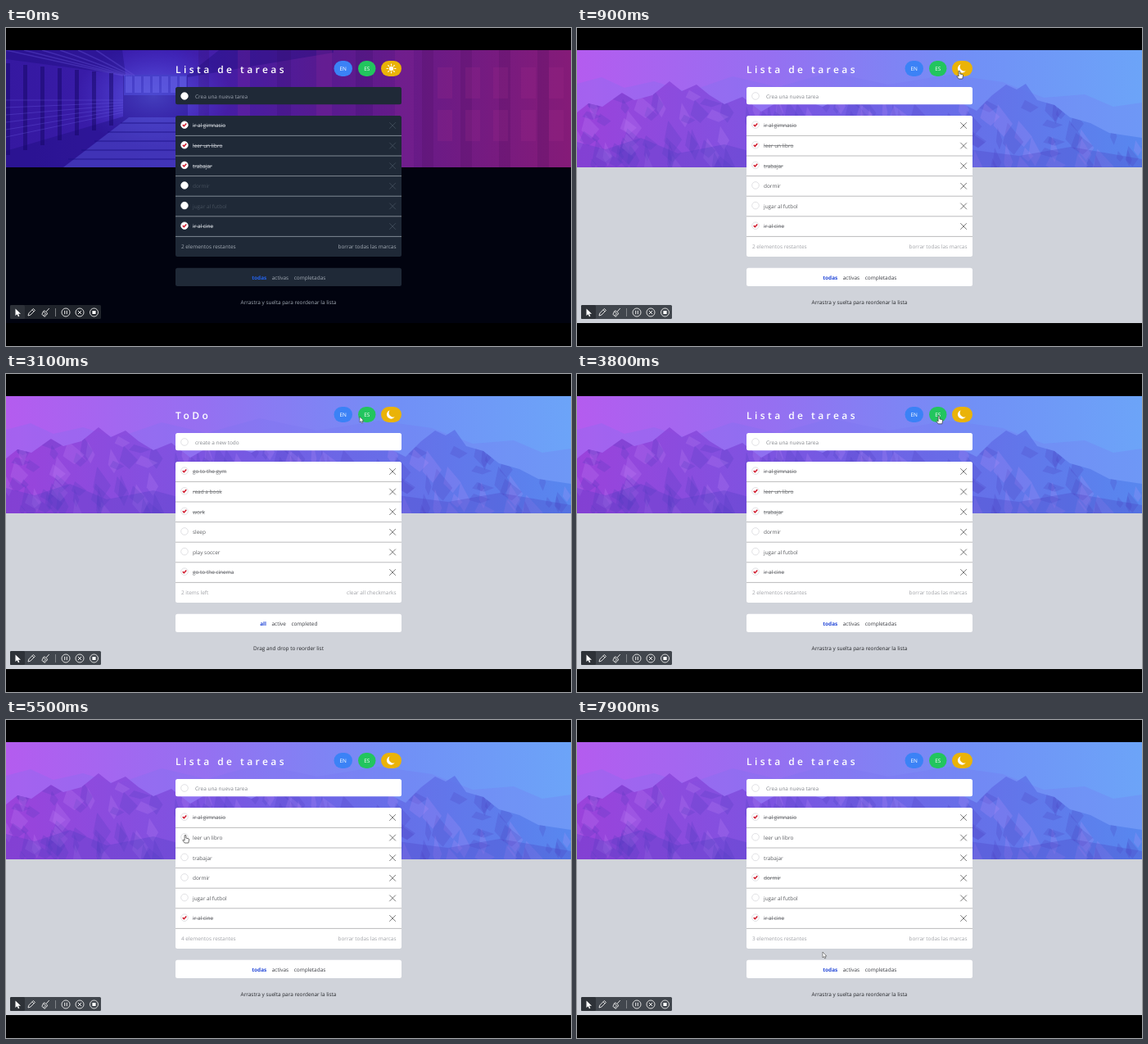
Write an HTML page that moves like this. It is 690x388 px and loops after 8 s.

```html
<!DOCTYPE html>
<html lang="es">
<head>
<meta charset="utf-8">
<style>
  html, body { margin: 0; width: 100%; height: 100%; overflow: hidden; background: #000; }
  svg { display: block; width: 100%; height: 100%; }
  text { font: 6.45px "Open Sans", "Noto Sans", sans-serif; text-rendering: geometricPrecision; white-space: pre; }
  .title { font-size: 12px; font-weight: 600; letter-spacing: 3.45px; }
  .done { text-decoration: line-through; }
  .active { font-weight: 700; }
</style>
</head>
<body>
<svg viewBox="0 0 690 388">
  <defs>
    <linearGradient id="night">
      <stop offset="0" stop-color="#3518a0"/><stop offset=".3" stop-color="#3c1fb0"/>
      <stop offset=".55" stop-color="#561a91"/><stop offset="1" stop-color="#851b78"/>
    </linearGradient>
    <linearGradient id="day">
      <stop offset="0" stop-color="#b45cef"/><stop offset=".35" stop-color="#9570f1"/>
      <stop offset=".7" stop-color="#7190f6"/><stop offset="1" stop-color="#6ca4f8"/>
    </linearGradient>
    <linearGradient id="rock">
      <stop offset="0" stop-color="#983bd6"/><stop offset=".4" stop-color="#7350de"/>
      <stop offset="1" stop-color="#5283ed"/>
    </linearGradient>
    <radialGradient id="glow">
      <stop offset="0" stop-color="#6f7cff" stop-opacity=".65"/><stop offset="1" stop-color="#5a50ee" stop-opacity="0"/>
    </radialGradient>
    <clipPath id="banner"><path d="M0 27H690V170H0Z"/></clipPath>
    <clipPath id="ridge"><path id="ridgeShape"/></clipPath>
  </defs>
  <g id="page"></g>
  <g id="cursor" stroke-linejoin="round"></g>
</svg>
<script>
const page = document.getElementById('page');
const cursor = document.getElementById('cursor');
const LOOP = 8000;

const THEMES = {
  dark: { body: '#01030f', card: '#1f2937', line: '#8b939e', done: '#d5d9df', open: '#46505d', cross: '#465260',
          ring: '#fff', ringLine: '#fff', input: '#9ca3af', foot: '#a3abb5', link: '#a3abb5', active: '#2563eb',
          hint: '#a3abb5', bar: '#20242b', barCell: '#2d3138' },
  light: { body: '#d0d3da', card: '#fff', line: '#b4b4b6', done: '#686a6e', open: '#5b5d61', cross: '#555',
           ring: '#fff', ringLine: '#d5d5d8', input: '#85888e', foot: '#a1a3a8', link: '#383a40', active: '#2549d8',
           hint: '#25272b', bar: '#41464d', barCell: '#2e3238' }
};
const WORDS = {
  es: { title: 'Lista de tareas', input: 'Crea una nueva tarea', left: 'elementos restantes', clear: 'borrar todas las marcas',
        items: ['ir al gimnasio', 'leer un libro', 'trabajar', 'dormir', 'jugar al futbol', 'ir al cine'],
        filters: ['todas', 'activas', 'completadas'], hint: 'Arrastra y suelta para reordenar la lista' },
  en: { title: 'ToDo', input: 'create a new todo', left: 'items left', clear: 'clear all checkmarks',
        items: ['go to the gym', 'read a book', 'work', 'sleep', 'play soccer', 'go to the cinema'],
        filters: ['all', 'active', 'completed'], hint: 'Drag and drop to reorder list' }
};
// time, x, y of the pointer's tip
const MOVES = [[800, 467, 52], [1000, 467, 52], [1500, 460, 53], [2200, 447, 52], [2400, 413, 51], [2900, 414, 52],
  [3100, 432, 52], [3500, 442, 50], [3900, 442, 51], [4500, 212, 153], [4800, 217, 165], [5100, 217, 165],
  [5400, 219, 140], [5700, 219, 140], [6300, 220, 153], [6500, 220, 153], [6800, 218, 190], [7100, 218, 190],
  [7400, 218, 209], [7600, 218, 209], [7900, 300, 283]];

const rect = (x, y, w, h, fill, r = 0, more = '') =>
  `<rect x="${x}" y="${y}" width="${w}" height="${h}" rx="${r}" fill="${fill}" ${more}/>`;
const path = (d, stroke, width = 1, fill = 'none', more = '') =>
  `<path d="${d}" stroke="${stroke}" stroke-width="${width}" fill="${fill}" ${more}/>`;
const circle = (x, y, r, fill, stroke = 'none', width = .7) =>
  `<circle cx="${x}" cy="${y}" r="${r}" fill="${fill}" stroke="${stroke}" stroke-width="${width}"/>`;
const text = (x, y, fill, words, cls = '', anchor = 'start') =>
  `<text x="${x}" y="${y}" fill="${fill}" class="${cls}" text-anchor="${anchor}">${words}</text>`;
const repeat = (n, draw) => Array.from({ length: n }, (_, i) => draw(i)).join('');

function seeded(seed) {
  return () => (seed = seed * 16807 % 2147483647) / 2147483647;
}

function corridor() {
  return rect(0, 27, 690, 143, 'url(#night)')
    + '<ellipse cx="180" cy="83" rx="95" ry="62" fill="url(#glow)"/>'
    + path('M0 27H142L146 57H222L260 27H400V30L222 60V108L400 170H0V150L143 108V57L0 38Z', 'none', 0, '#180a75', 'opacity=".35"')
    + rect(144, 57, 77, 25, '#5555e6', 0, 'opacity=".5"')
    + repeat(7, i => rect(146 + i * 11, 59, 8, 20, '#817fff', 0, 'opacity=".3"'))
    + repeat(6, i => path(`M${i * 22} 27L${142 + i * 3} 58`, '#6b58dc', 1.5, 'none', 'opacity=".35"'))
    + repeat(7, i => rect(i * 21, 43 + i * 2, 5, 112 - i * 8, '#150766', 0, 'opacity=".5"'))
    + repeat(6, i => path(`M0 ${88 + i * 9}L143 ${88 + i * 3}`, '#7265e8', 1, 'none', 'opacity=".3"'))
    + path('M150 109H215L300 170H70Z', 'none', 0, '#6e78fa', 'opacity=".3"')
    + repeat(5, i => path(`M${140 - i * 16} ${116 + i * 11}H${226 + i * 15}`, '#190d82', 2, 'none', 'opacity=".4"'))
    + repeat(6, i => rect(235 + i * 48, 27, 13 + i * 2, 143, i % 2 ? '#972a9a' : '#2e0d63', 0, 'opacity=".2"'))
    + repeat(4, i => rect(508 + i * 47, 27, 14, 143, '#4a105e', 0, 'opacity=".22"'))
    + repeat(10, i => rect(527 + i % 5 * 34, 48 + i % 2 * 52, 18, 38, '#a7308d', 0, 'opacity=".18"'));
}

const RIDGE = 'M0 103L14 92 31 96 55 79 70 88 92 82 113 65 128 77 146 69 162 82 180 93 202 84 225 102 260 82 300 96'
  + ' 345 73 385 92 426 76 460 87 488 101 507 82 524 69 537 75 548 68 562 88 583 94 602 109 627 116 650 128 690 134V170H0Z';
document.getElementById('ridgeShape').setAttribute('d', RIDGE);

function mountains() {
  const random = seeded(73);
  const facet = i => {
    const x = random() * 700, y = 72 + random() * 88, w = 5 + random() * 16, h = 10 + random() * 30;
    return path(`M${x} ${y}l${w} ${h * .6}l${-w * .6} ${h * .4}l${-w * .7} ${-h * .35}Z`, 'none', 0,
      i % 3 ? '#4938b8' : '#d29bff', `opacity="${i % 3 ? .2 : .16}"`);
  };
  return rect(0, 27, 690, 143, 'url(#day)')
    + path('M0 68L30 60 58 73 94 65 135 78 190 59 245 72 310 54 380 69 455 57 520 66 570 85 620 81 655 96 690 91V170H0Z',
      'none', 0, '#7770ed', 'opacity=".24"')
    + path(RIDGE, 'none', 0, 'url(#rock)', 'opacity=".8"')
    + `<g clip-path="url(#ridge)">${repeat(170, facet)}</g>`
    + path('M0 139L35 148 78 134 123 153 180 142 240 158 470 147 540 156 603 145 690 160V170H0Z',
      'none', 0, '#493bbd', 'opacity=".28"');
}

function toolbar(c) {
  const ink = '#eee';
  return rect(5, 338, 111, 17, c.bar, 1.5) + rect(5, 338, 18, 17, c.barCell, 1.5)
    + path('M11.5 342.5V351l2.1-1.8 1.4 3 1.4-.7-1.4-2.8H18Z', 'none', 0, '#fff')
    + path('M27 351l.8-3 5.6-5.6 2.1 2.1-5.6 5.6ZM32 343.8l2.1 2.1', ink, .9)
    + path('M52.8 342l-3.6 4M47 344.8l4 3.7-1.6 1-4-3.6ZM45.4 346l-1.5 3.5 3.5 2.8 2-2.8M46.4 350.8l1-1.6', ink, .9)
    + path('M60.5 342V352', '#92959a', .8)
    + [73, 90, 107.5].map(x => circle(x, 347, 5, 'none', ink, .9)).join('')
    + path('M71.7 344.8v4.4M74.3 344.8v4.4M88 345l4 4m0-4l-4 4', ink, 1)
    + rect(105.4, 344.9, 4.2, 4.2, '#fff', .4);
}

function themeIcon(dark) {
  if (!dark) return path('M468.8 44.3A5.3 5.3 0 1 0 474.7 52.2 5.1 5.1 0 0 1 468.8 44.3Z', 'none', 0, '#fff');
  return circle(470.5, 49.5, 2.7, '#fff')
    + repeat(8, i => `<path d="M470.5 45.5v-1.5" stroke="#fff" stroke-linecap="round" transform="rotate(${i * 45} 470.5 49.5)"/>`);
}

function row(c, label, done, i) {
  const y = 119 + i * 24.6;
  return circle(218, y - .8, 4.3, c.ring, c.ringLine)
    + (done ? path(`M215.8 ${y - .9}l1.6 1.6 2.9-3.2`, '#d0182b', 1.5) : '')
    + text(228, y + 2.4, done ? c.done : c.open, label, done ? 'done' : '')
    + path(`M468.3 ${y - 3.8}l7.6 7.6m0-7.6l-7.6 7.6`, c.cross, .8)
    + path(`M207 ${y + 12.4}H483`, c.line, .9);
}

function drawPage({ theme, lang, done }) {
  const c = THEMES[theme], w = WORDS[lang], dark = theme === 'dark';
  const filters = w.filters.map((name, i) =>
    `<tspan dx="${i ? 6.5 : 0}" class="${i ? '' : 'active'}" fill="${i ? c.link : c.active}">${name}</tspan>`).join('');
  page.innerHTML = rect(0, 0, 690, 388, '#000') + rect(0, 27, 690, 333, c.body)
    + `<g clip-path="url(#banner)">${dark ? corridor() : mountains()}</g>`
    + text(207, 54.6, '#fff', w.title, 'title')
    + rect(400.5, 40, 22.5, 19, '#3b82f6', 9.5) + text(411.7, 51.9, '#fff', 'EN', '', 'middle')
    + rect(430, 40, 21.5, 19, '#22c55e', 9.5) + text(440.7, 51.9, '#fff', 'ES', '', 'middle')
    + rect(458, 40, 25, 19, '#eab308', 9.5) + themeIcon(dark)
    + rect(207, 72, 276, 21.3, c.card, 2.5)
    + circle(218, 83, 4.3, c.ring, c.ringLine) + text(231, 85.5, c.input, w.input)
    + rect(207, 107, 276, 172, c.card, 2.5)
    + w.items.map((label, i) => row(c, label, done[i], i)).join('')
    + text(214, 269.4, c.foot, `${done.filter(d => !d).length} ${w.left}`)
    + text(476.5, 269.4, c.foot, w.clear, '', 'end')
    + rect(207, 292.7, 276, 22.3, c.card, 2.5) + text(345.3, 307.3, c.link, filters, '', 'middle')
    + text(345, 336.8, c.hint, w.hint, '', 'middle')
    + toolbar(c);
}

const HAND = path('M-.9 5.8V.9Q0-.5 .9 .9V4.1L4 4.8Q4.8 5 4.6 6.2L3.8 10H-.8L-3.2 6.8Q-2.7 5.5-.9 7Z', '#333', .7, '#fff');
const ARROW = path('M0 0V7L1.6 5.6 2.7 8 3.9 7.4 2.8 5.1H4.8Z', '#444', .6, '#fff');

function stateAt(t) {
  return {
    theme: t < 900 ? 'dark' : 'light',
    lang: t >= 2600 && t < 3800 ? 'en' : 'es',
    done: [true, t < 5400, t < 4900, t >= 6900, false, true]
  };
}

function drawCursor(t) {
  cursor.style.display = t < MOVES[0][0] ? 'none' : '';
  const next = Math.max(1, MOVES.findIndex(m => m[0] >= t));
  const [t0, x0, y0] = MOVES[next - 1], [t1, x1, y1] = MOVES[next];
  const p = Math.max(0, (t - t0) / (t1 - t0)), ease = p * p * (3 - 2 * p);
  cursor.setAttribute('transform', `translate(${x0 + (x1 - x0) * ease} ${y0 + (y1 - y0) * ease})`);
  const arrow = t > 2900 && t < 3300 || t > 3900 && t < 4400 || t > 7600;
  cursor.innerHTML = arrow ? ARROW : HAND;
}

let shown = '';
function frame(now) {
  const t = Math.floor(now % LOOP / 100) * 100;
  const state = stateAt(t), key = JSON.stringify(state);
  if (key !== shown) drawPage(state);
  shown = key;
  drawCursor(t);
  requestAnimationFrame(frame);
}
const start = performance.now();
frame(0);
function tick() { return performance.now() - start; }
</script>
</body>
</html>
```
